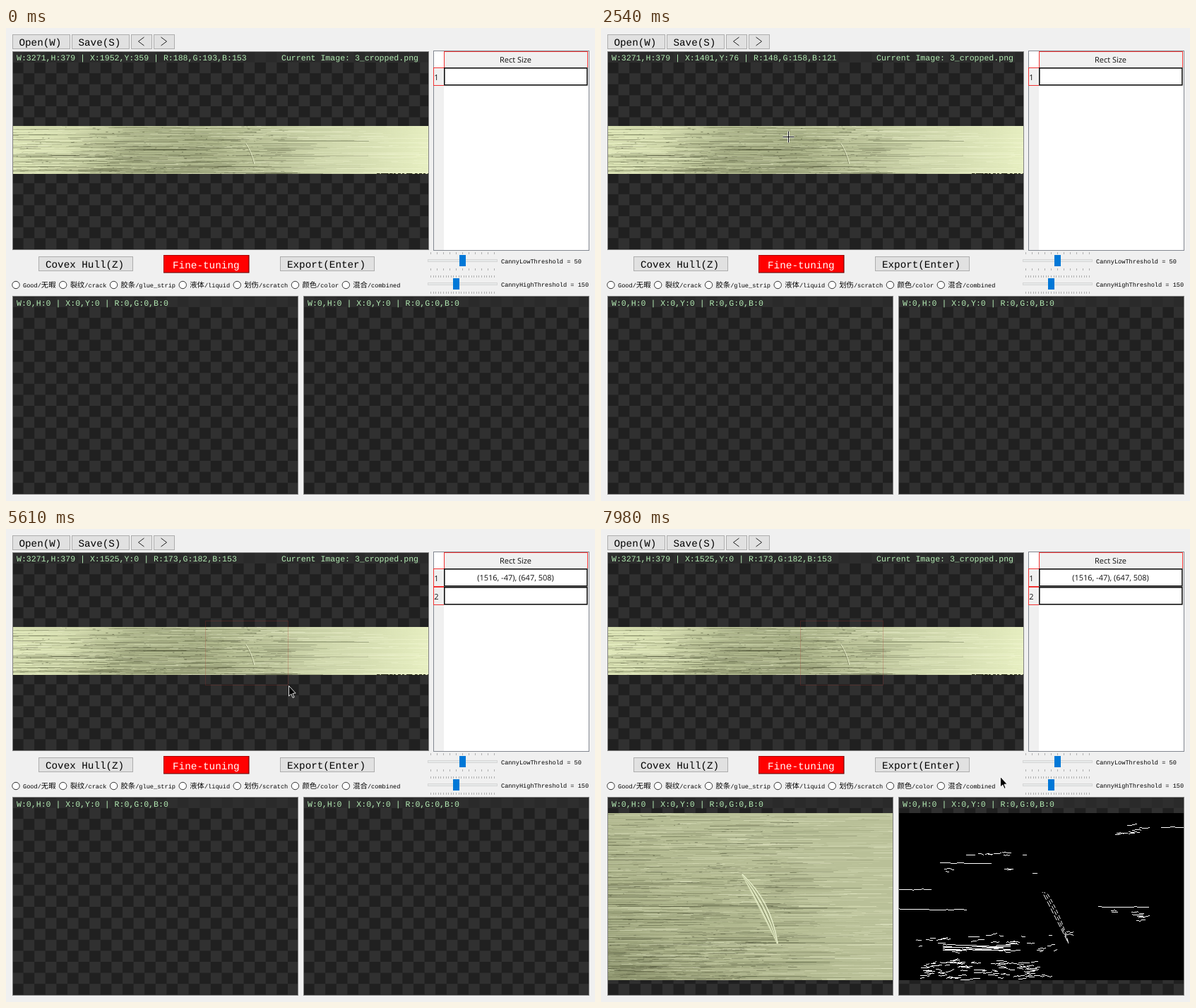
An HTML page with a canvas that plays this animation: 834 by 671 pixels, repeating every 8 s.

```html
<!DOCTYPE html>
<html lang="en">
<head>
<meta charset="utf-8">
<title>Defect labelling tool</title>
<style>
html, body { margin: 0; width: 100%; height: 100%; overflow: hidden; background: #f0f0f0; }
canvas { display: block; }
</style>
</head>
<body>
<canvas id="stage" width="834" height="671"></canvas>
<script>
const W = 834, H = 671, LOOP = 8000, LAG = 35;
const ENTER = 674, EXIT = 3505, DRAG = 4000, TABLE = 5610, CROP = 7110;
const MONO = '"Liberation Mono", monospace';
const CJK = '"Noto Sans CJK SC", "Noto Sans CJK", sans-serif';
const SANS = '"Open Sans", "Noto Sans", sans-serif';
const ctx = document.getElementById('stage').getContext('2d');

// Image pixels to stage position and back
const ZOOM = 0.18015, LEFT = 9.5, TOP = 139.5;
const at = (x, y) => [LEFT + x * ZOOM, TOP + y * ZOOM];
const pixel = ([x, y]) => [Math.round((x - LEFT) / ZOOM), Math.round((y - TOP) / ZOOM)];

// Arrival time, leaving time, place
const path = [
  [130, 130, [513, 660]],
  [ENTER, ENTER, at(1952, 359)],
  [740, 1010, [351, 174]],
  [1395, 1910, at(1650, 19)],
  [2380, 2380, [259, 156]],
  [2505, 2505, at(1400, 76)],
  [2700, 2730, [282, 158]],
  [3200, 3200, [290, 150]],
  [EXIT, EXIT, at(1525, 0)],
  [3540, 3980, [283, 131]],
  [4800, 5000, [398, 225]],
  [5200, TABLE, [400, 222]],
  [6080, 7450, [490, 260]],
  [7980, LOOP, [565, 351]]
];
// Metal colour by image column
const shades = [
  [1400, 1400, [148, 158, 121]], [1525, 1525, [173, 182, 153]],
  [1650, 1650, [179, 189, 154]], [1952, 1952, [188, 193, 153]]
];

function track(keys, t) {
  let last = keys[0];
  for (const key of keys) {
    if (t < key[0]) {
      const u = Math.max(0, (t - last[1]) / (key[0] - last[1]));
      return last[2].map((v, k) => v + (key[2][k] - v) * u);
    }
    last = key;
  }
  return last[2];
}

function random(seed) {
  return () => {
    seed = (seed + 0x6D2B79F5) | 0;
    let r = Math.imul(seed ^ (seed >>> 15), 1 | seed);
    r = (r + Math.imul(r ^ (r >>> 7), 61 | r)) ^ r;
    return ((r ^ (r >>> 14)) >>> 0) / 4294967296;
  };
}

function layer(w, h, paint) {
  const c = document.createElement('canvas');
  c.width = w;
  c.height = h;
  const g = c.getContext('2d');
  g.textRendering = 'geometricPrecision';
  paint(g, w, h);
  return c;
}

function fill(g, color, x, y, w, h) {
  g.fillStyle = color;
  g.fillRect(x, y, w, h);
}

function frame(g, color, x, y, w, h, line = 1) {
  g.strokeStyle = color;
  g.lineWidth = line;
  g.strokeRect(x + line / 2, y + line / 2, w - line, h - line);
}

function box(g, back, edge, x, y, w, h) {
  fill(g, back, x, y, w, h);
  frame(g, edge, x, y, w, h);
}

// Half-width Latin cells next to full-width Chinese ones; returns the end
function mono(g, text, x, y, cell, color = '#000') {
  g.fillStyle = color;
  g.textAlign = 'left';
  for (const part of text.match(/[\u2e80-\uffff]+|[^\u2e80-\uffff]+/g)) {
    const wide = part.charCodeAt(0) > 0x2e7f;
    g.font = wide ? `${cell * 2}px ${CJK}` : `${cell / 0.6}px ${MONO}`;
    g.fillText(part, x, y);
    x += g.measureText(part).width;
  }
  return x;
}

function overlay(g, text, x, y) {
  mono(g, text, x, y, 6.935, '#b4ecb4');
}

function label(g, text, x, y) {
  g.font = `11px ${SANS}`;
  g.textAlign = 'center';
  g.fillStyle = '#111';
  g.fillText(text, x, y);
}

function button(g, text, x, y, w, pad) {
  box(g, '#e1e1e1', '#adadad', x, y, w, 21);
  mono(g, text, x + pad, y + 15.5, 8.55);
}

function arrowButton(g, x, dir) {
  box(g, '#e1e1e1', '#adadad', x, 9, 30, 21);
  g.strokeStyle = '#222';
  g.beginPath();
  g.moveTo(x + 14.5 + 4 * dir, 13);
  g.lineTo(x + 14.5 - 4 * dir, 19);
  g.lineTo(x + 14.5 + 4 * dir, 25);
  g.stroke();
}

function viewer(g, x, y, w, h) {
  const size = 15.6;
  g.save();
  g.beginPath();
  g.rect(x, y, w, h);
  g.clip();
  fill(g, '#202020', x, y, w, h);
  for (let r = 0; r * size < h; r++)
    for (let c = r % 2; c * size < w; c += 2)
      fill(g, '#303030', x + c * size, y + r * size, size, size);
  fill(g, 'rgba(46,46,46,.75)', x, y, w, 16);
  g.restore();
  frame(g, '#828282', x, y, w, h);
}

function slider(g, y, share, steps) {
  box(g, '#e7eaea', '#d6d6d6', 597, y - 2, 99, 4);
  for (let i = 0; i <= steps; i++)
    for (const dy of [-12, 11])
      fill(g, '#b0b0b0', Math.round(601 + 90 * i / steps), y + dy, 1, 3);
  fill(g, '#0078d7', Math.round(597 + 90 * share), y - 8, 9, 16);
}

function row(g, n, text) {
  const y = 30 + n * 26;
  box(g, '#f0f0f0', '#f03030', 605, y, 16, 26);
  label(g, n, 609.5, y + 17.5);
  fill(g, '#fff', 620, y, 204, 26);
  frame(g, '#111', 620, y, 203.7, 25.7, 1.6);
  label(g, text, 721.5, y + 17);
}

function ramp(g, x0, y0, x1, y1, colors) {
  const out = g.createLinearGradient(x0, y0, x1, y1);
  colors.forEach((c, i) => out.addColorStop(i / (colors.length - 1), c));
  return out;
}

// Brushed metal: long faint streaks, more dark ones low and to the left
function brush(g, w, h, rnd, count, strength) {
  for (let i = 0; i < count; i++) {
    const dark = rnd() < 0.5;
    const x = (rnd() * (dark ? 0.8 : 1.2) - 0.15) * w;
    const y = Math.floor(Math.pow(rnd(), dark ? 0.75 : 1) * h);
    const a = rnd() * rnd() * strength;
    fill(g, dark ? `rgba(50,54,30,${a})` : `rgba(250,253,222,${a})`,
      x, y, 5 + rnd() * rnd() * 170, 1);
  }
  for (let i = 0; i < 150; i++)
    fill(g, `rgba(45,48,28,${0.1 + rnd() * 0.35})`,
      rnd() * w * 0.65, rnd() * h, 1 + rnd() * 3, 1);
}

const strip = layer(588, 68, (g, w, h) => {
  const rnd = random(7);
  fill(g, ramp(g, 0, 0, w, 40, [
    '#dfe7b8', '#d2daac', '#b2ba8f', '#a8b086', '#b9c196', '#cbd3a8', '#d6deb2', '#e6eec0'
  ]), 0, 0, w, h);
  brush(g, w, h, rnd, 1500, 0.42);
  for (let x = 515; x < w; x += 6) fill(g, '#35381f', x, h - 1, 2 + rnd() * 5, 1);
  for (const [dx, color] of [[-1, 'rgba(90,94,62,.5)'], [0, '#eaf0cc']]) {
    g.strokeStyle = color;
    g.beginPath();
    g.moveTo(330 + dx, 25);
    g.quadraticCurveTo(338 + dx, 37, 342 + dx, 54);
    g.stroke();
  }
});

// One curve of the scratch, shared by the crop and its edges
function scratch(g, bulge) {
  g.beginPath();
  g.moveTo(190, 87);
  g.quadraticCurveTo(222 + bulge * 2, 129 - bulge, 240, 185);
  g.stroke();
}

const crop = layer(403, 237, (g, w, h) => {
  const rnd = random(21);
  fill(g, ramp(g, 0, h, w * 0.5, 0, ['#949b74', '#abb289', '#b5bc93', '#b9c098']), 0, 0, w, h);
  brush(g, w, h, rnd, 3000, 0.4);
  for (let i = 0; i < 170; i++)
    fill(g, `rgba(50,54,32,${rnd() * 0.35})`, rnd() * 210, 180 + rnd() * 56, 3 + rnd() * 22, 1);
  fill(g, 'rgba(236,242,200,.65)', 0, 134, 115, 1);
  fill(g, 'rgba(236,242,200,.5)', 270, 132, 110, 1);
  for (let bulge = -4; bulge <= 4; bulge += 2) {
    g.lineWidth = 2;
    g.strokeStyle = 'rgba(216,224,182,.7)';
    scratch(g, bulge);
    g.lineWidth = 1;
    g.strokeStyle = bulge % 4 ? 'rgba(70,74,46,.6)' : '#eef4d4';
    scratch(g, bulge + 0.7);
  }
});

const edges = layer(403, 237, (g, w, h) => {
  const rnd = random(5);
  const run = (x, y, length, wobble) => {
    for (let i = 0; i < length; i++) {
      if (rnd() < wobble) y += rnd() < 0.5 ? -1 : 1;
      fill(g, '#fff', Math.round(x + i), Math.round(y), 1, 1);
    }
  };
  const cluster = (x, y, cw, ch, n) => {
    for (let i = 0; i < n; i++) run(x + rnd() * cw, y + rnd() * ch, 4 + rnd() * 12, 0.2);
  };
  fill(g, '#000', 0, 0, w, h);
  for (const [x, y, n] of [[371, 20, 32], [58, 70, 73], [0, 108, 46], [0, 135, 96], [282, 132, 72]])
    run(x, y, n, 0.05);
  for (let y = 186; y < 195; y += 2) run(62, y, 96, 0.06);
  cluster(20, 172, 200, 24, 30);
  cluster(28, 209, 175, 27, 85);
  cluster(95, 55, 85, 4, 9);
  cluster(292, 18, 50, 14, 9);
  for (let i = 0; i < 9; i++) cluster(60 + rnd() * 310, 70 + rnd() * 125, 8, 4, 2);

  g.strokeStyle = '#fff';
  for (let bulge = -4; bulge <= 4; bulge += 2.7) {
    g.setLineDash([5 + rnd() * 4, 3]);
    g.save();
    g.beginPath();
    g.rect(0, bulge > 3 ? 0 : 112, w, h);
    g.clip();
    scratch(g, bulge);
    g.restore();
  }
  run(189, 85, 7, 0.5);
});

const base = layer(W, H, g => {
  fill(g, '#f0f0f0', 0, 0, W, H);
  button(g, 'Open(W)', 9, 9, 82, 9.5);
  button(g, 'Save(S)', 93, 9, 82, 9.5);
  arrowButton(g, 177, 1);
  arrowButton(g, 209, -1);

  viewer(g, 9, 33, 590, 282);
  g.drawImage(strip, 10, 139);
  overlay(g, 'Current Image: 3_cropped.png', 390, 46);
  for (const x of [9, 421]) {
    viewer(g, x, 380, 405, 282);
    overlay(g, 'W:0,H:0 | X:0,Y:0 | R:0,G:0,B:0', x + 6, 394);
  }

  box(g, '#fff', '#828790', 605, 32, 221, 284);
  fill(g, '#f0f0f0', 606, 56, 14, 259);
  box(g, '#f0f0f0', '#f03030', 620, 33, 204, 24);
  label(g, 'Rect Size', 721.5, 48.5);

  button(g, 'Covex Hull(Z)', 46, 324, 134, 10);
  button(g, 'Export(Enter)', 388, 324, 134, 10);
  fill(g, '#5a0000', 223, 322, 121.5, 25.5);
  fill(g, '#f00', 223.5, 322.5, 120, 24);
  mono(g, 'Fine-tuning', 236, 340.5, 8.6, '#fff');

  let x = 14;
  for (const text of ['Good/无暇', '裂纹/crack', '胶条/glue_strip', '液体/liquid',
    '划伤/scratch', '颜色/color', '混合/combined']) {
    g.beginPath();
    g.arc(x, 364.5, 5.2, 0, 7);
    g.fillStyle = '#fff';
    g.fill();
    g.strokeStyle = '#333';
    g.lineWidth = 1;
    g.stroke();
    x = mono(g, text, x + 10, 368, 5.17) + 10.2;
  }

  slider(g, 330, 0.5, 10);
  slider(g, 363, 0.4, 25);
  mono(g, 'CannyLowThreshold = 50', 701, 334, 5.19);
  mono(g, 'CannyHighThreshold = 150', 701, 367, 5.19);
});

const pointer = new Path2D('M.5 .5V15L3.8 12 6.1 17.3 8.1 16.5 5.9 11.3 10.1 10.9Z');

function drawArrow(x, y) {
  ctx.save();
  ctx.translate(x, y);
  ctx.fillStyle = '#000';
  ctx.fill(pointer);
  ctx.strokeStyle = '#fff';
  ctx.lineWidth = 0.9;
  ctx.stroke(pointer);
  ctx.restore();
}

function drawCross(x, y) {
  for (const [color, width] of [['#fff', 2.6], ['#000', 1]]) {
    ctx.strokeStyle = color;
    ctx.lineWidth = width;
    ctx.beginPath();
    ctx.moveTo(x - 7.5, y + 0.5);
    ctx.lineTo(x + 8.5, y + 0.5);
    ctx.moveTo(x + 0.5, y - 7.5);
    ctx.lineTo(x + 0.5, y + 8.5);
    ctx.stroke();
  }
}

function draw(t) {
  ctx.drawImage(base, 0, 0);
  // The readout trails the cursor and holds its value off the image
  const seen = Math.min(EXIT, Math.max(ENTER, t - LAG));
  const [px, py] = pixel(track(path, seen));
  const [r, g, b] = track(shades, px).map(Math.round);
  overlay(ctx, `W:3271,H:379 | X:${px},Y:${py} | R:${r},G:${g},B:${b}`, 15, 46);

  const done = t >= TABLE;
  row(ctx, 1, done ? '(1516, -47), (647, 508)' : '');
  if (done) row(ctx, 2, '');

  if (t >= CROP) {
    ctx.drawImage(crop, 10, 403);
    ctx.drawImage(edges, 422, 403);
  }

  const [x, y] = track(path, t).map(Math.round);
  if (t >= DRAG) {
    const [ex, ey] = done ? [400, 222] : [x, y];
    ctx.strokeStyle = 'rgba(170,50,40,.25)';
    ctx.lineWidth = 1;
    ctx.strokeRect(282.5, 130.5, ex - 283, ey - 131);
  }
  if (t < path[0][0]) return;
  const overImage = t < DRAG && y >= 139 && y < 207;
  (overImage ? drawCross : drawArrow)(x, y);
}

ctx.textRendering = 'geometricPrecision';
const start = performance.now();
function tick() {
  draw((performance.now() - start) % LOOP);
  requestAnimationFrame(tick);
}
tick();
</script>
</body>
</html>
```
